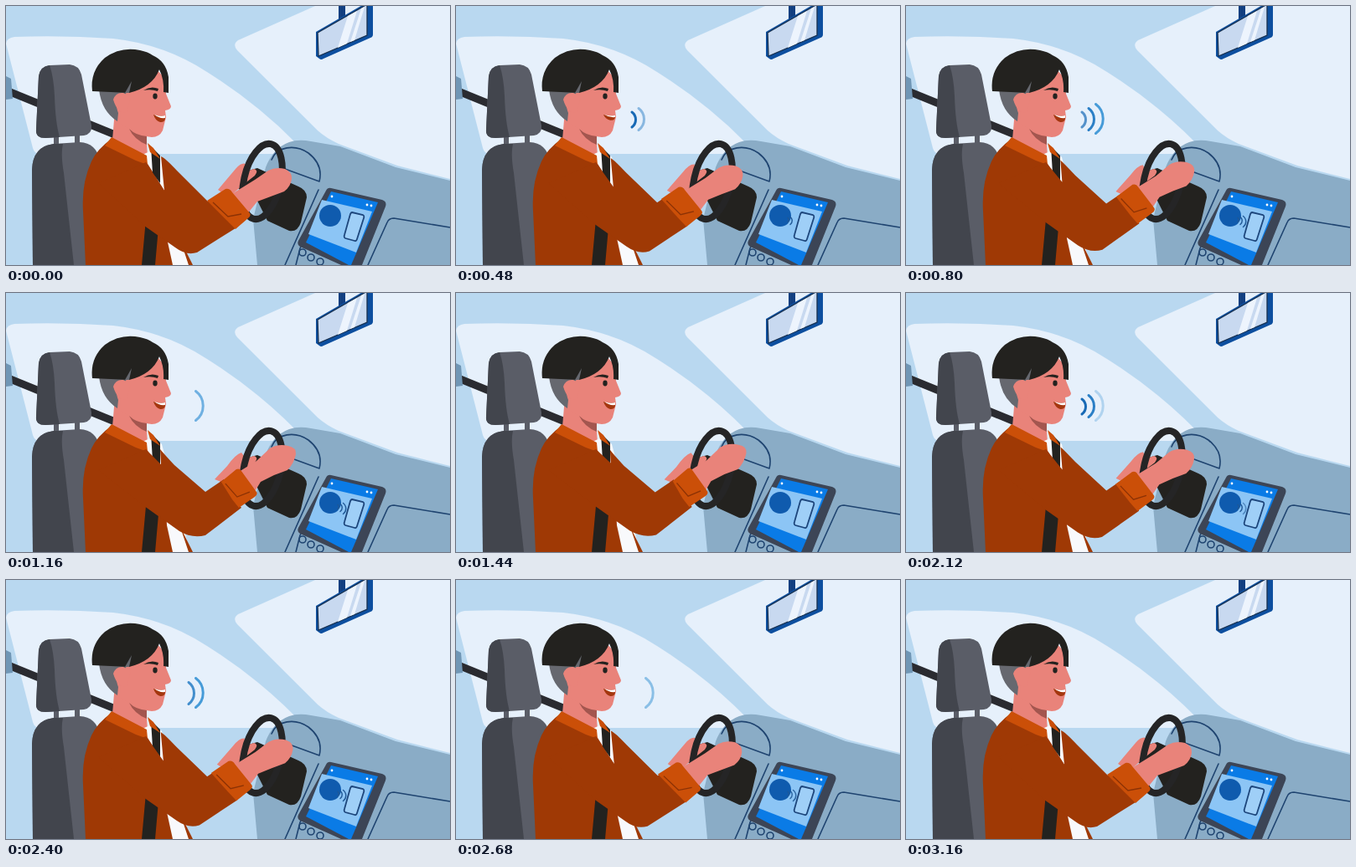
These frames come from a looping animation (530 px wide and 310 px high, 3200 ms). An HTML page:

```html
<!DOCTYPE html>
<html lang="en">
<head>
<meta charset="utf-8">
<title>Hands-free call in the car</title>
<style>
html, body { margin: 0; width: 100%; height: 100%; overflow: hidden; background: #b9d8f0; }
svg { display: block; width: 530px; height: 310px; }
.line { fill: none; stroke: #1f4470; stroke-width: 1.6; stroke-linecap: round; stroke-linejoin: round; }
.wave { fill: none; stroke-linecap: round; }
.skin { fill: #e9837a; }
.coat { fill: #9f3905; }
.trim { fill: #cb4f08; }
.black { fill: #23221f; }
.seat { fill: #5a5d67; }
.shade { fill: #42454d; }
</style>
</head>
<body>
<svg viewBox="0 0 530 310">
  <rect width="530" height="310" fill="#b9d8f0"/>

  <!-- windows -->
  <g fill="#e6f0fb">
    <path d="M0 45Q1 38 10 37Q70 35 128 39Q190 46 240 79Q300 117 346 164L334 177H40Q34 177 32 170Z"/>
    <path d="M277 41L369 0H530V207L467 191L397 165Q382 158 372 149L276 53Q270 46 277 41Z"/>
  </g>

  <!-- mirror -->
  <path d="M397 0h8v16h-8Z" fill="#123f80"/>
  <path d="M370 31L427 -2H438V34Q438 37 435 38L379 63Q376 65 374 63L370 60Z" fill="#0d4f9f"/>
  <path d="M372 32L431 -2V35L373 60Z" fill="#c8d9f0" stroke="#17304f" stroke-width="1.3"/>
  <path d="M408 12L419 6L407 45L396 50ZM424 3L428 1L416 41L411 43Z" fill="#edf4fd"/>

  <!-- dashboard -->
  <path d="M300 310L295 255L310 193Q319 170 338 163Q349 159 364 162L399 168L465 193L530 209V310Z" fill="#8aacc6"/>
  <path class="line" d="M317 184C323 168 345 165 361 176Q379 190 374 210L333 195M373 220L333 310M346 310L351 290Q353 284 360 287L405 310M432 310L455 259Q457 254 463 254L530 265"/>
  <g class="line">
    <circle cx="354" cy="295" r="4"/><circle cx="364" cy="301" r="4"/><circle cx="375" cy="306" r="4"/>
  </g>

  <!-- touch screen -->
  <path d="M388 218L449 232Q455 234 453 240L425 310H400L351 288Q347 286 349 281L382 221Q384 217 388 218Z" fill="#3c4556"/>
  <path d="M388 222L444 235L412 310H409L358 283Z" fill="#0a7be6"/>
  <path d="M377 232L437 246L418 295L361 273Z" fill="#8cc5f5"/>
  <g fill="#fff">
    <circle cx="389" cy="228" r="1.4"/><circle cx="431" cy="238" r="1.4"/><circle cx="436" cy="239" r="1.4"/>
  </g>
  <circle cx="387" cy="251" r="13" fill="#0f5bae"/>
  <path d="M413 247L426 250Q428 251 427 254L419 279Q418 282 416 281L405 278Q403 277 404 274L411 249Q412 247 413 247Z" fill="#9fcff7" stroke="#1d467c" stroke-width="1.8"/>
  <g id="screenWaves" stroke="#1f5795" stroke-width="1.4"></g>

  <!-- belt and seat -->
  <path d="M0 101L130 154" stroke="#2a2b30" stroke-width="9"/>
  <path d="M0 84L6 87L8 111L0 112Z" fill="#7096b5"/>
  <path class="seat" d="M57 153h6v16h-6ZM82 151h6v17h-6Z"/>
  <path class="seat" d="M36 148L39 84Q41 72 52 71L76 70Q87 71 90 82L102 143Q103 153 93 155L47 158Q35 158 36 148Z"/>
  <path class="shade" d="M36 148L39 84Q41 72 52 71Q57 85 58 108Q59 140 64 157L47 158Q35 158 36 148Z"/>
  <path class="seat" d="M32 310L31 196Q32 168 57 165L88 163Q108 164 112 185L120 310Z"/>
  <path class="shade" d="M32 310L31 196Q32 168 57 165H68Q65 177 69 200L81 310Z"/>

  <!-- torso -->
  <path class="skin" d="M130 125L167 150L169 180L160 182L127 160Z"/>
  <path d="M163 178L176 172L186 181L212 280L219 310H160Z" fill="#f8f9fc"/>
  <path class="coat" d="M126 159L166 184L189 221L192 278L199 310H95L92 245Q90 212 102 186Q109 171 126 159ZM208 280L223 310H218Z"/>
  <path class="black" d="M173 168L184 179V212L175 200ZM167 255L182 265L178 310H162Z"/>

  <!-- head -->
  <path class="skin" d="M128 112L146 92L178 74L190 87L191 105L197 120Q197 124 190 125L191 133L187 149Q183 157 174 157L160 155L134 140Z"/>
  <path d="M147 147Q155 155 168 156V166Q153 160 147 147Z" fill="#a3564f"/>
  <path d="M111 100H147L137 112Q129 115 134 128L133 138Q114 126 111 100Z" fill="#66686f"/>
  <path class="skin" d="M128 112Q131 103 140 104L149 109L144 128Q133 129 128 112Z"/>
  <path class="black" d="M103 102Q100 78 118 62Q137 48 160 53Q170 55 175 59Q191 66 194 85V104L188 103Q189 88 183 76Q175 97 147 104L103 102Z"/>
  <path d="M142 104L150 90L147 104Z" fill="#66686f"/>
  <path class="black" d="M164 101Q173 95 182 99L181 102Q173 99 164 101Z"/>
  <ellipse class="black" cx="178" cy="108" rx="2.7" ry="3.4"/>
  <g id="mouth">
    <path d="M176 130Q184 133 190 131Q191 140 184 139Q178 137 176 130Z" fill="#a4370f"/>
    <path d="M177 130Q184 133 190 131V134Q183 135 177 130Z" fill="#fff"/>
  </g>
  <path class="trim" d="M126 157L168 179L169 190L155 185L118 167Z"/>
  <path class="trim" d="M169 164L176 170L184 183L172 175Z"/>
  <g id="voiceWaves" stroke-width="3"></g>

  <!-- steering wheel and arms -->
  <path class="black" d="M282 199L300 194L349 216Q359 220 359 229L352 259Q348 271 338 269L312 257L296 225L276 218Z"/>
  <path class="skin" data-pose="farHand"/>
  <ellipse cx="306" cy="210" rx="22" ry="46" transform="rotate(13 306 210)" fill="none" stroke="#252526" stroke-width="8"/>
  <path class="coat" data-pose="sleeve"/>
  <path class="skin" data-pose="hand"/>
  <path class="trim" data-pose="cuff"/>
  <path data-pose="cuffFold" fill="none" stroke="#8c3205" stroke-width="1.3"/>
</svg>
<script>
const LOOP = 3200, SECOND = 1480, TURN = 1440;
const $ = id => document.getElementById(id);
const ramp = (t, a, b) => Math.min(1, Math.max(0, (t - a) / (b - a)));
const smooth = u => u * u * (3 - 2 * u);

// Each part as [resting, turned]
const poses = {
  farHand: [
    'M253 220L274 195Q281 187 286 189L287 198L296 195Q302 197 297 203L283 214L266 229Z',
    'M249 223L264 207Q274 193 281 191L286 198L296 195Q302 197 297 203L283 213L266 230Z'],
  sleeve: [
    'M110 212L167 187L189 221L185 180Q190 182 204 197L241 234L262 220L274 266L228 295Q215 299 202 289L165 263Z',
    'M110 212L167 187L185 205L184 187Q188 192 201 206L238 238L260 223L281 257L238 290Q222 294 207 285L165 255Z'],
  hand: [
    'M268 226L297 208L313 197Q322 192 333 195Q342 199 341 207Q340 216 332 222L316 228L300 234L287 250Z',
    'M278 214L299 201L315 186Q325 180 337 183Q347 185 346 193Q344 204 336 212L320 218L304 226L295 241Z'],
  cuff: [
    'M240 233L262 219Q267 218 270 223L291 248Q293 251 289 254L274 267L264 257Z',
    'M257 226L275 211Q279 209 281 213L299 238Q301 241 297 244L278 257L270 247Z'],
  cuffFold: [
    'M247 235L265 252L281 249',
    'M262 228L276 244L291 238']
};
const parts = [...document.querySelectorAll('[data-pose]')].map(el => {
  const [a, b] = poses[el.dataset.pose];
  return { el, a, to: b.match(/[\d.]+/g) };
});

function makeWaves(id, arcs, colors) {
  return arcs.map(([x, y, h], i) => {
    const p = document.createElementNS('http://www.w3.org/2000/svg', 'path');
    const r = h * 1.25;
    p.setAttribute('class', 'wave');
    p.setAttribute('d', `M${x} ${y - h}A${r} ${r} 0 0 1 ${x} ${y + h}`);
    if (colors) p.setAttribute('stroke', colors[i]);
    $(id).append(p);
    return p;
  });
}
const voice = makeWaves('voiceWaves',
  [[210, 136, 9], [218, 135.5, 13], [226.5, 135, 17.5]],
  ['#1769b5', '#2b7fc6', '#469bd8']);
const signal = makeWaves('screenWaves',
  [[396, 256, 2.5], [399, 257, 4.5], [402.5, 258, 6.5]]);

// Fade times: in from, in to, out from, out to
const voiceFades = [[250, 400, 760, 900], [400, 560, 900, 1060], [580, 760, 1100, 1340]];
const signalFades = [[190, 270, 1180, 1360], [350, 470, 1180, 1360], [560, 700, 1180, 1360]];

function fade(waves, fades, t) {
  waves.forEach((w, i) => {
    const [a, b, c, d] = fades[i];
    w.style.opacity = ramp(t, a, b) * (1 - ramp(t, c, d));
  });
}

function draw(now) {
  const t = now % LOOP;
  // The wheel swings out and straight back, a little past the turned pose
  const turn = 1.1 * smooth(1 - Math.min(1, Math.abs(t - TURN) / TURN));
  for (const { el, a, to } of parts) {
    let i = 0;
    el.setAttribute('d', a.replace(/[\d.]+/g, n => (+n + (to[i++] - n) * turn).toFixed(2)));
  }
  const beat = t < SECOND ? t : t - SECOND;
  fade(voice, voiceFades, beat);
  fade(signal, signalFades, beat);
  const close = smooth(ramp(t, 360, 460)) - smooth(ramp(t, 500, 600));
  $('mouth').setAttribute('transform', `translate(0 130) scale(1 ${1 - 0.25 * close}) translate(0 -130)`);
}

const start = performance.now();
function tick() {
  draw(performance.now() - start);
  requestAnimationFrame(tick);
}
tick();
</script>
</body>
</html>
```
